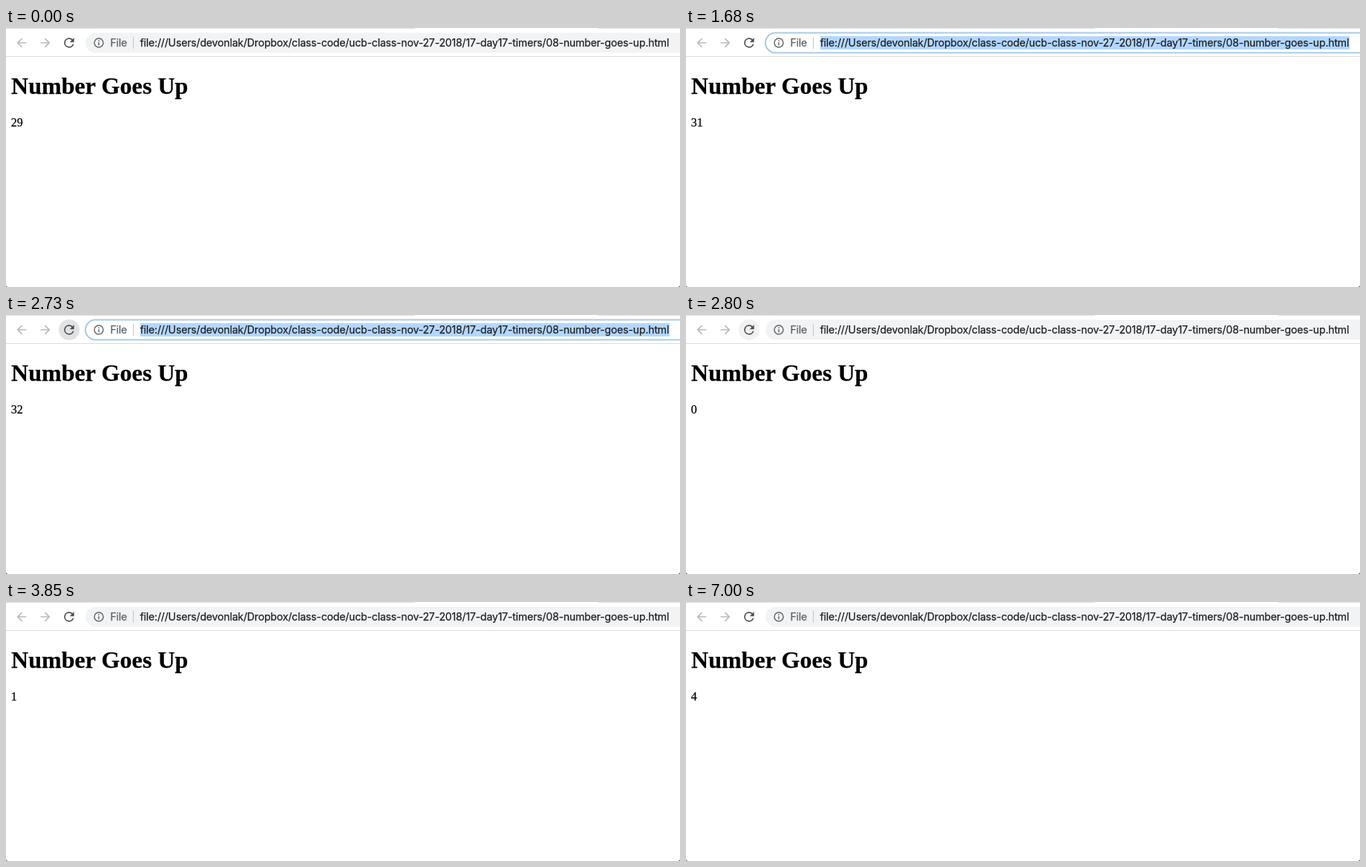
Write an HTML page that moves like this. It is 908x350 px and loops after 7.91 s.

```html
<!DOCTYPE html>
<html lang="en">
<head>
<meta charset="utf-8">
<title>Number Goes Up</title>
<style>
  html, body { margin: 0; width: 100%; height: 100%; overflow: hidden; background: #fff; }
  svg { display: block; }
  .ui { font: 14px Inter, Roboto, sans-serif; letter-spacing: -.147px; }
  .ui, .page { stroke-width: .25; }
  .page { font: 16px "Liberation Serif", Times, serif; stroke: #000; }
  .page .title { font-size: 32px; font-weight: bold; letter-spacing: .06px; }
</style>
</head>
<body>
<svg width="908" height="350" viewBox="0 0 908 350">
  <defs>
    <path id="arrow" d="M20 11H7.83l5.59-5.59L12 4l-8 8 8 8 1.41-1.41L7.83 13H20z"/>
  </defs>

  <!-- toolbar -->
  <path d="M0 .5H551M798 .5H908" stroke="#dee1e6"/>
  <path d="M0 38.5H908" stroke="#dcdcdc"/>
  <g fill="#b8babd">
    <use href="#arrow" transform="translate(21 20) scale(.8) translate(-12 -12)"/>
    <use href="#arrow" transform="translate(53 20) scale(-.8 .8) translate(-12 -12)"/>
  </g>
  <circle id="hover" cx="85" cy="20" r="14"/>
  <path fill="#4c4f53" transform="translate(85 20) scale(.84) translate(-12 -12)"
    d="M17.65 6.35A7.96 7.96 0 0 0 12 4a8 8 0 1 0 7.73 10h-2.08A6 6 0 1 1 12 6c1.66 0 3.14.69 4.22 1.78L13 11h7V4z"/>

  <!-- address bar -->
  <rect id="bar" x="107" y="6.5" width="830" height="27" rx="13.5" stroke-width="2"/>
  <g fill="none" stroke="#5f6368" stroke-width="1.4">
    <circle cx="125" cy="20" r="6"/>
    <path d="M125 16.4v1.5M125 19.2v4.2"/>
  </g>
  <path d="M171.5 12v16" stroke="#c4c7ca"/>
  <rect id="selection" x="181" y="11" width="713" height="18" fill="#b3d7ff"/>
  <g class="ui">
    <text x="140.5" y="25" fill="#5f6368" stroke="#5f6368">File</text>
    <text x="180.5" y="25" fill="#202124" stroke="#202124">file:///Users/devonlak/Dropbox/class-code/ucb-class-nov-27-2018/17-day17-timers/08-number-goes-up.html</text>
  </g>

  <!-- page -->
  <g class="page">
    <text class="title" x="7" y="89">Number Goes Up</text>
    <text id="count" x="6.7" y="133"></text>
  </g>
  <path d="M0 348v2h2zM908 348v2h-2z" fill="#666"/>
</svg>
<script>
  const LOOP = 7910, TICK = 1050;
  const FOCUS = 1680, HOVER = 2660, PRESS = 2730, RELOAD = 2800, LEAVE = 3220;
  const $ = id => document.getElementById(id);
  const start = performance.now();

  function draw(now) {
    const t = Math.max(0, now - start) % LOOP;
    const focused = t >= FOCUS && t < RELOAD;

    $('count').textContent = t < RELOAD
      ? 29 + Math.floor((t + 420) / TICK)
      : Math.floor((t - RELOAD) / TICK);

    $('bar').setAttribute('fill', focused ? '#fff' : '#f1f3f4');
    $('bar').setAttribute('stroke', focused ? '#a9cbe8' : 'none');
    $('selection').setAttribute('visibility', focused ? 'visible' : 'hidden');

    const hover = t < HOVER || t >= LEAVE ? 'none'
      : t < PRESS ? '#f1f1f2'
      : t < RELOAD ? '#e1e2e4' : '#f1f1f2';
    $('hover').setAttribute('fill', hover);

    requestAnimationFrame(draw);
  }
  draw(start);
</script>
</body>
</html>
```
